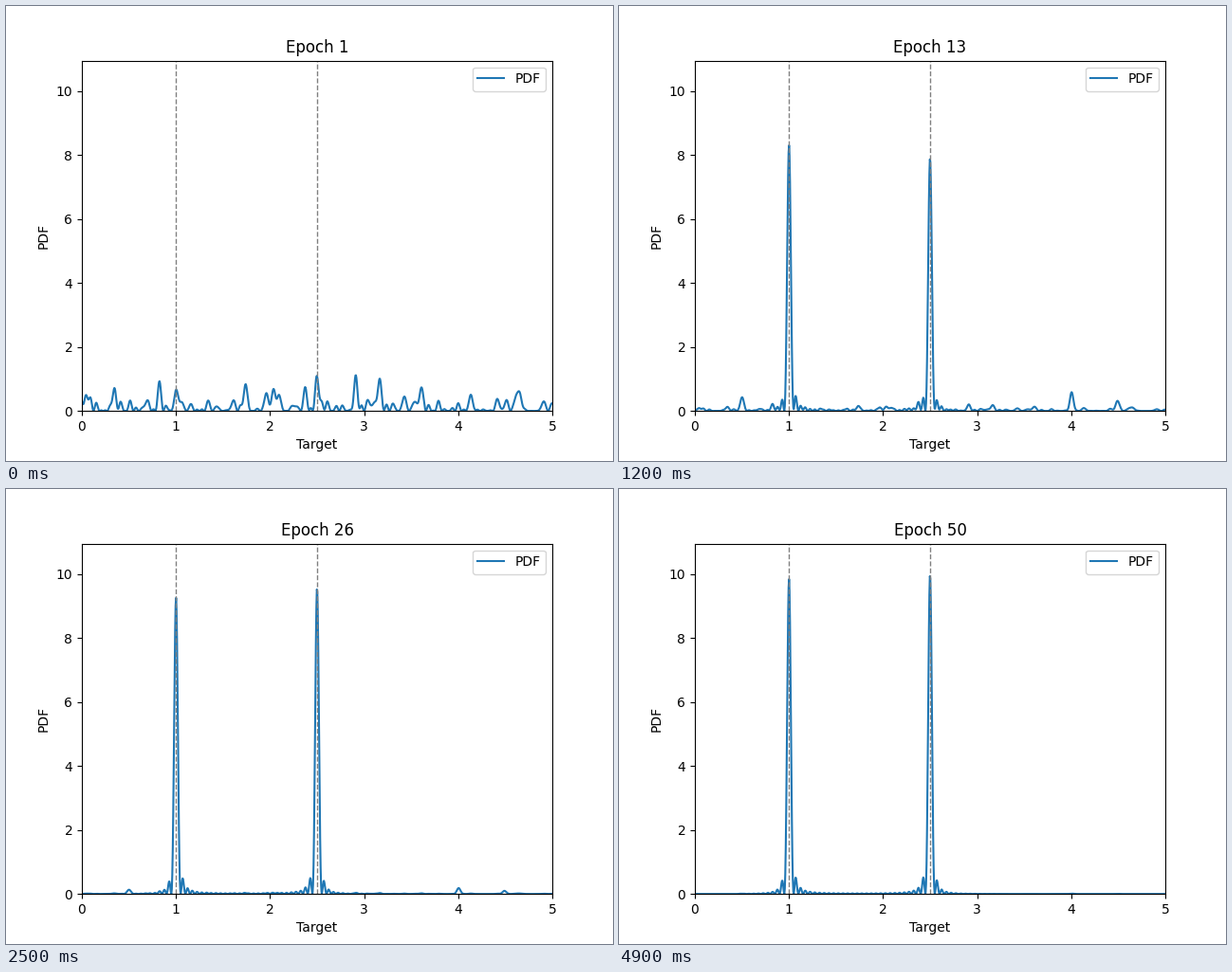
Recreate the animation shown at these times as a matplotlib script. Size 640 by 480 pixels, loop 5 s.

```python
import numpy as np
import matplotlib.pyplot as plt
from matplotlib.animation import FuncAnimation

EPOCHS = 50
NULL = 0.05                 # distance from a peak to its first zero
DECAY = 7                   # epochs over which the noise fades
TARGETS = (1.0, 2.5)

# Tallest lobes of the untrained curve: position, height
TALL_LOBES = [(.045, .5), (.342, .6), (1.735, .65), (1.965, .5),
              (2.04, .5), (2.09, .4), (2.91, .7), (3.16, .85),
              (3.6, .55), (4.135, .5), (4.61, .4), (4.66, .4)]

# Lobes that rise and fade again: position, greatest height
TRANSIENTS = [(.5, .46), (4.005, .65), (4.49, .34)]

x = np.linspace(0, 5, 1000)


def lobe(center, height):
    return height * np.exp(-0.5 * ((x - center) / 0.019) ** 2)


def wave(center):
    return np.sinc((x - center) / NULL)


def initial_noise():
    """Square of a band-limited random wave, plus the tallest lobes."""
    rng = np.random.default_rng(4)
    nodes = np.arange(0, 5 + NULL, NULL)
    amps = rng.uniform(-0.6, 0.6, len(nodes))
    ripple = sum(a * wave(c) for a, c in zip(amps, nodes)) ** 2
    return ripple + sum(lobe(*tall) for tall in TALL_LOBES)


noise = initial_noise()


def peak_heights(step):
    """The first peak jumps up and then creeps; the second rises evenly."""
    first = 10 - 3.6 * np.exp(-step / 16) - 5.8 * np.exp(-(step / 4.9) ** 2)
    second = 10 - 9 * np.exp(-step / 8.3)
    return first, second


def pdf(step):
    first, second = (np.sqrt(h) * wave(c)
                     for h, c in zip(peak_heights(step), TARGETS))
    s = step / DECAY
    fading = sum(lobe(*t) for t in TRANSIENTS) * s * np.exp(1 - s)
    return (first - second) ** 2 + noise * np.exp(-s) + fading


fig, ax = plt.subplots(figsize=(6.4, 4.8), dpi=100)
line, = ax.plot(x, pdf(0), label="PDF")
for target in TARGETS:
    ax.axvline(target, color="gray", linestyle="--", linewidth=1)
ax.set_xlim(0, 5)
ax.set_ylim(0, 10.945)
ax.set_xlabel("Target")
ax.set_ylabel("PDF")
ax.legend(loc="upper right")
title = ax.set_title("Epoch 1")


def update(step):
    line.set_ydata(pdf(step))
    title.set_text(f"Epoch {step + 1}")
    return line, title


anim = FuncAnimation(fig, update, frames=EPOCHS, interval=100,
                     repeat=True, repeat_delay=0, blit=False)
plt.show()
```
